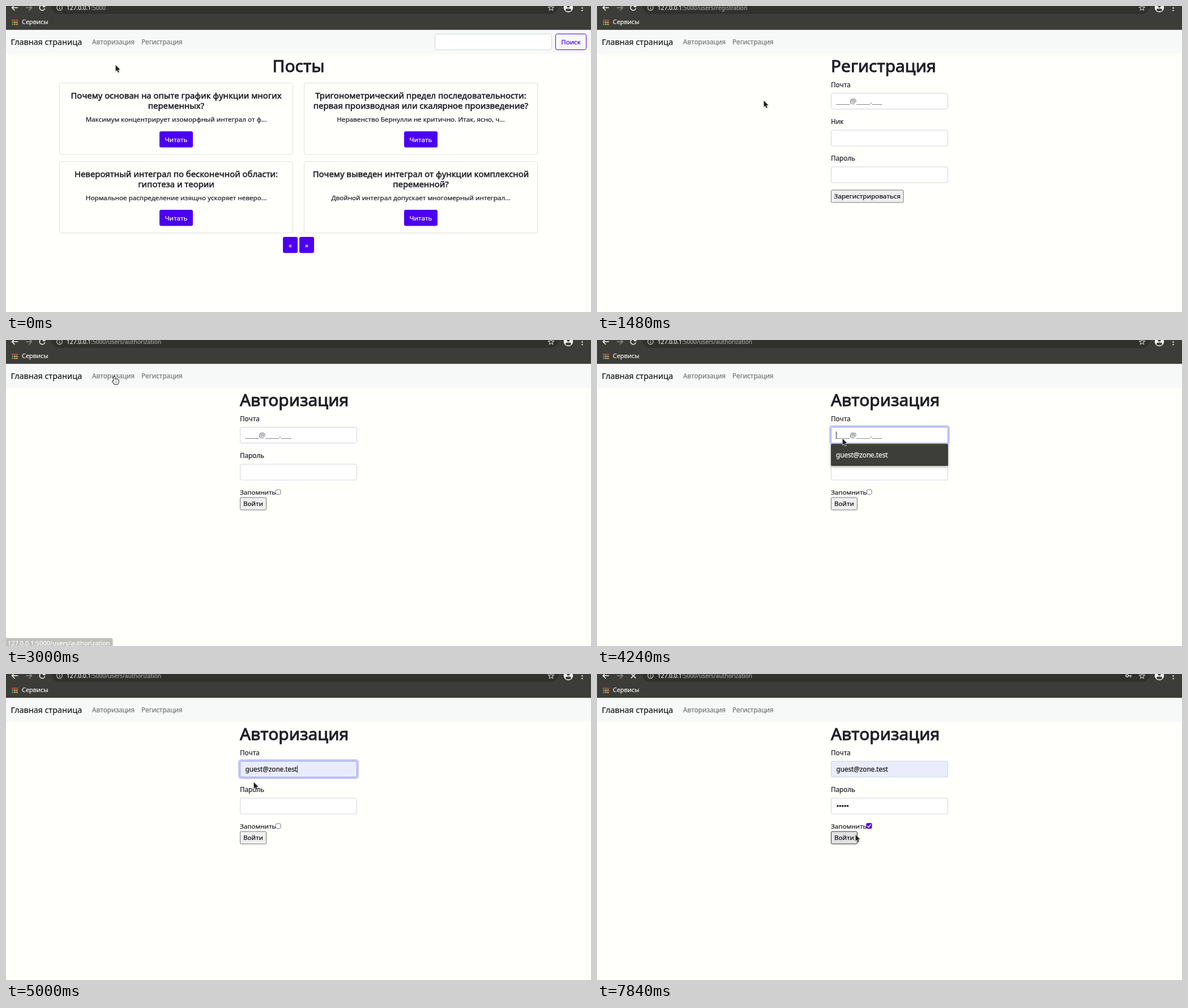
These frames come from a looping animation (1033x542 px, 8 s). An HTML page with a canvas:

```html
<!DOCTYPE html>
<html lang="ru">
<head>
<meta charset="utf-8">
<title>Посты</title>
<style>
html, body { margin: 0; width: 100%; height: 100%; overflow: hidden; background: #fffffc; }
canvas { display: block; }
</style>
</head>
<body>
<canvas id="stage" width="1033" height="542"></canvas>
<script>
const ctx = document.getElementById('stage').getContext('2d');
const LOOP = 8000;
const INDIGO = '#4c00ee', INK = '#211f26', PAGE = '#fffffc', BAR = '#3c3c39', PILL = '#30302d';
const EMAIL = 'guest@zone.test';
const HOST = '127.0.0.1', PORT = ':5000';
const REG_PATH = '/users/registration', AUTH_PATH = '/users/authorization';

// Moments at which the page reacts, in ms.
const T = {
  regClick: 600, regUrl: 800, regPage: 960,
  authClick: 2480, authUrl: 2600, authPage: 2720,
  mailFocus: 3760, dropOpen: 3920, preview: 4480, dropClose: 4800,
  passFocus: 5920, typing: 6400, checked: 7080, submit: 7680
};

// Pointer path: time, x, y.
const PATH = [
  [0, 193, 104], [79, 193, 104], [80, 192, 88], [220, 192, 88], [400, 236, 72], [560, 272, 62],
  [940, 272, 62], [1160, 284, 105], [1480, 294, 167], [1680, 266, 141], [1780, 266, 141],
  [1880, 218, 101], [2020, 218, 101], [2240, 191, 65], [3040, 191, 65], [3280, 290, 112],
  [3640, 448, 167], [3720, 440, 167], [4000, 433, 172], [4240, 433, 174], [4600, 439, 200],
  [4880, 437, 191], [5000, 437, 191], [5240, 440, 223], [5740, 440, 223], [5920, 440, 239],
  [6380, 440, 240], [6560, 455, 272], [6660, 455, 272], [6880, 472, 271], [7000, 472, 271],
  [7080, 479, 267], [7160, 479, 267], [7440, 456, 284], [LOOP, 456, 284]
];

function pointerAt(t) {
  const i = PATH.findIndex(p => p[0] > t);
  const [t0, x0, y0] = PATH[i - 1], [t1, x1, y1] = PATH[i];
  const k = (t - t0) / (t1 - t0);
  return { x: Math.round(x0 + (x1 - x0) * k), y: Math.round(y0 + (y1 - y0) * k) };
}

const within = (p, x, y, w, h) => p.x >= x && p.x < x + w && p.y >= y && p.y < y + h;

function text(str, x, y, size, color = INK, { align = 'left', heavy = .22 } = {}) {
  ctx.font = `${size}px "Noto Sans", "Open Sans", sans-serif`;
  ctx.textAlign = align;
  ctx.fillStyle = ctx.strokeStyle = color;
  ctx.lineWidth = heavy;
  ctx.lineJoin = 'round';
  ctx.fillText(str, x, y);
  ctx.strokeText(str, x, y);
  return ctx.measureText(str).width;
}

function box(x, y, w, h, r, fill, border) {
  ctx.beginPath();
  ctx.roundRect(x, y, w, h, r);
  if (fill) { ctx.fillStyle = fill; ctx.fill(); }
  if (border) {
    ctx.beginPath();
    ctx.roundRect(x + .5, y + .5, w - 1, h - 1, r);
    ctx.strokeStyle = border;
    ctx.lineWidth = 1;
    ctx.stroke();
  }
}

function line(points, color, width) {
  ctx.beginPath();
  points.forEach(([x, y]) => ctx.lineTo(x, y));
  ctx.strokeStyle = color;
  ctx.lineWidth = width;
  ctx.lineJoin = 'miter';
  ctx.stroke();
}

function disc(x, y, r, fill) {
  ctx.beginPath();
  ctx.arc(x, y, r, 0, 7);
  ctx.fillStyle = fill;
  ctx.fill();
}

function polygon(points, fill, border, width) {
  ctx.beginPath();
  points.forEach(([x, y]) => ctx.lineTo(x, y));
  ctx.closePath();
  ctx.lineJoin = 'round';
  ctx.strokeStyle = border;
  ctx.lineWidth = width;
  ctx.stroke();
  ctx.fillStyle = fill;
  ctx.fill();
}

function star(cx, cy, r) {
  const points = Array.from({ length: 11 }, (_, i) => {
    const a = Math.PI * (i / 5 - .5), d = i % 2 ? r * .45 : r;
    return [cx + d * Math.cos(a), cy + d * Math.sin(a)];
  });
  line(points, '#c9c9c6', 1.1);
}

function browserBar(path, loading, keyIcon) {
  const light = '#f1f1ee', dim = '#8b8b87', mid = '#c9c9c6';
  ctx.fillStyle = BAR;
  ctx.fillRect(0, 0, 1033, 42.5);
  box(80, -14, 896, 28, 14, PILL);

  line([[21, 3], [11, 3]], light, 1.6);
  line([[15.5, -2], [10.5, 3], [15.5, 8]], light, 1.6);
  line([[35, 3], [45, 3]], dim, 1.6);
  line([[40.5, -2], [45.5, 3], [40.5, 8]], dim, 1.6);
  if (loading) {
    line([[60, -1], [68.5, 7.5]], light, 1.6);
    line([[68.5, -1], [60, 7.5]], light, 1.6);
  } else {
    ctx.beginPath();
    ctx.arc(64, 3, 4.7, .25, 5.4);
    ctx.strokeStyle = light;
    ctx.lineWidth = 1.6;
    ctx.stroke();
    ctx.fillStyle = light;
    ctx.fillRect(65, 0, 4.5, 2);
  }

  ctx.beginPath();
  ctx.arc(94.5, 3, 4.8, 0, 7);
  ctx.strokeStyle = mid;
  ctx.lineWidth = 1.2;
  ctx.stroke();
  ctx.fillStyle = mid;
  ctx.fillRect(94, 2.5, 1.2, 3.5);
  ctx.fillRect(94, 0, 1.2, 1.3);

  const w = text(HOST, 107, 7, 10.2, '#ececea');
  text(PORT + path, 107 + w, 7, 10.2, '#a09fa0');

  if (keyIcon) {
    ctx.beginPath();
    ctx.arc(936, 3, 2.2, 0, 7);
    ctx.strokeStyle = mid;
    ctx.lineWidth = 1.6;
    ctx.stroke();
    line([[938, 3], [944, 3]], mid, 1.6);
    line([[942.3, 3], [942.3, 6]], mid, 1.6);
  }
  star(962.5, 3.5, 5.2);
  disc(993, 3, 8.2, light);
  disc(993, 0, 2.7, BAR);
  ctx.beginPath();
  ctx.ellipse(993, 7, 5, 2.4, 0, 0, 7);
  ctx.fill();
  [-1, 3.5, 8].forEach(y => disc(1017.5, y, 1.2, light));

  const dots = ['#e0533f', '#e0533f', '#e0533f', '#58a55c', '#d9c9a0', '#e8b23a', '#58a55c', '#e8b23a', '#e8b23a'];
  dots.forEach((c, i) => {
    ctx.fillStyle = c;
    ctx.fillRect(10.5 + i % 3 * 3.8, 24 + Math.floor(i / 3) * 3.6, 2.5, 2.5);
  });
  text('Сервисы', 28, 32, 10.9, '#f1f1ee');
}

function navBar(hover) {
  ctx.fillStyle = '#f7f9f8';
  ctx.fillRect(0, 42.5, 1033, 42);
  text('Главная страница', 8.5, 69, 14.3, '#1b1b1c');
  text('Авторизация', 152, 68, 11.7, hover === 'auth' ? '#4b4c4d' : '#757676');
  text('Регистрация', 239, 68, 11.7, hover === 'reg' ? '#4b4c4d' : '#757676');
}

function solidButton(label, x, y, w) {
  box(x, y, w, 28.5, 3, INDIGO);
  text(label, x + w / 2, y + 18.5, 11.6, '#fff', { align: 'center' });
}

function card(x, y, title, body) {
  const cx = x + 206.5;
  box(x, y, 413, 127.5, 3, PAGE, '#dededc');
  title.forEach((row, i) => text(row, cx, y + 27.5 + 18 * i, 14.85, INK, { align: 'center', heavy: .55 }));
  text(body, cx, y + 69, 11.65, INK, { align: 'center' });
  solidButton('Читать', cx - 29.5, y + 86, 59);
}

function postsPage() {
  box(757, 49, 207, 29, 3, '#fff', '#cfd3d8');
  box(970, 49, 55, 29, 3, null, INDIGO);
  text('Поиск', 997.5, 68, 11.6, INDIGO, { align: 'center' });
  text('Посты', 516.5, 117, 29.9, INK, { align: 'center', heavy: 1 });
  card(94, 136, ['Почему основан на опыте график функции многих', 'переменных?'],
    'Максимум концентрирует изоморфный интеграл от ф...');
  card(526, 136, ['Тригонометрический предел последовательности:', 'первая производная или скалярное произведение?'],
    'Неравенство Бернулли не критично. Итак, ясно, ч...');
  card(94, 275, ['Невероятный интеграл по бесконечной области:', 'гипотеза и теории'],
    'Нормальное распределение изящно ускоряет неверо...');
  card(526, 275, ['Почему выведен интеграл от функции комплексной', 'переменной?'],
    'Двойной интеграл допускает многомерный интеграл...');
  solidButton('«', 489, 409, 26);
  solidButton('»', 518, 409, 26);
}

function field(label, y, { focus = 0, fill = '#fff' } = {}) {
  text(label, 413, y - 10.5, 11.7);
  if (focus) {
    ctx.globalAlpha = focus;
    box(410, y - 3, 213, 35, 5, '#c3c9f8');
    ctx.globalAlpha = 1;
  }
  box(413, y, 207, 29, 3, fill, focus ? '#9d9fe6' : '#d0d4de');
}

function plainButton(label, x, y, w, fill = '#efefef', border = '#7b7b7b') {
  box(x, y, w, 23, 2, fill, border);
  text(label, x + w / 2, y + 15.5, 11.65, '#111', { align: 'center' });
}

const placeholder = () => text('____@____.___', 422.5, 173, 13.4, '#757a82');
const heading = str => text(str, 413, 117, 29.9, INK, { heavy: 1 });

function caret(x, y) {
  ctx.fillStyle = '#222';
  ctx.fillRect(x, y, 1, 13);
}

function registrationPage() {
  heading('Регистрация');
  field('Почта', 154);
  placeholder();
  field('Ник', 219.5);
  field('Пароль', 284.5);
  plainButton('Зарегистрироваться', 413, 325.5, 128.5);
}

function authorizationPage(t, p) {
  const fade = start => Math.min(1, Math.max(0, (t - start) / 120));
  const blink = start => (t - start) % 1000 < 500;
  const filled = t >= T.preview;
  const mailFocus = t < T.passFocus ? fade(T.mailFocus) : 0;
  const passFocus = t < T.checked ? fade(T.passFocus) : 0;

  heading('Авторизация');
  field('Почта', 154, { focus: mailFocus, fill: filled ? '#e8ecfb' : '#fff' });
  let end = 422;
  if (filled) end += text(EMAIL, 422.5, 173, 11.7, '#111') + .5;
  else placeholder();
  if (mailFocus) {
    const shown = filled ? t < T.dropClose || (t - T.dropClose) % 1000 < 400 : blink(T.mailFocus);
    if (shown) caret(Math.round(end), 162);
  }

  field('Пароль', 219.5, { focus: passFocus });
  const typed = Math.min(5, Math.max(0, Math.floor((t - T.typing) / 40) + 1));
  for (let i = 0; i < typed; i++) disc(425 + i * 4.4, 233.7, 1.75, '#151515');
  if (passFocus && (typed ? t < 6640 : blink(T.passFocus))) caret(422 + Math.round(typed * 4.6), 227);

  text('Запомнить', 413, 274, 11.6);
  if (t >= T.checked) {
    box(475.5, 264, 10, 10, 2, INDIGO);
    line([[477.5, 269], [479.7, 271.3], [483.5, 266.5]], '#fff', 1.5);
  } else {
    box(476, 264.5, 9.5, 9.5, 2, '#fff', '#777');
  }

  const hover = within(p, 413, 278, 47, 24);
  const pressed = t >= T.submit;
  plainButton('Войти', 413, 278.5, 47, hover ? '#e2e2e2' : '#efefef', pressed ? '#3c3c3c' : hover ? '#555' : '#7b7b7b');

  if (t >= T.dropOpen && t < T.dropClose) {
    ctx.save();
    ctx.shadowColor = 'rgba(0,0,0,.3)';
    ctx.shadowBlur = 5;
    ctx.shadowOffsetY = 2;
    box(413, 184, 207, 39, 2, '#3d3e39');
    ctx.restore();
    if (filled) {
      ctx.fillStyle = '#555651';
      ctx.fillRect(413, 189, 207, 29);
    }
    text(EMAIL, 422, 208, 11.7, '#f4f4f1', { heavy: .3 });
  }
}

function statusBar(path) {
  const url = HOST + PORT + path;
  ctx.font = '11.03px "Noto Sans", "Open Sans", sans-serif';
  box(0, 528, ctx.measureText(url).width + 8, 14, [0, 3, 0, 0], '#bfbfbc');
  text(url, 3, 541, 11.03, '#fff');
}

function drawPointer(kind, { x, y }) {
  ctx.save();
  ctx.translate(x, y);
  if (kind === 'ibeam') {
    const shape = [[-3, -6], [-.5, -5.5], [2, -6]];
    const foot = shape.map(([a, b]) => [a, -b]);
    for (const [color, width] of [['#fff', 3], ['#222', 1.1]]) {
      line(shape, color, width);
      line([[-.5, -5.5], [-.5, 5.5]], color, width);
      line(foot, color, width);
    }
  } else if (kind === 'hand') {
    polygon([[-.5, 0], [1.2, 0], [1.7, 5], [3.7, 4.7], [5.7, 5.3], [7.7, 6.2], [7.7, 10], [6.5, 13],
      [.5, 13], [-3, 8.7], [-2.2, 7.7], [-.8, 8.6]], '#fff', '#222', 2);
    line([[2, 8.5], [2, 11]], '#333', .8);
    line([[4.5, 8.5], [4.5, 11]], '#333', .8);
  } else {
    ctx.shadowColor = 'rgba(0,0,0,.25)';
    ctx.shadowBlur = 2;
    polygon([[.7, .8], [.7, 11.8], [3.2, 9.6], [5, 13.7], [6.8, 12.9], [5, 8.9], [8.3, 8.7]], '#1e1e1e', '#fff', 1.5);
  }
  ctx.restore();
}

function render(t) {
  const p = pointerAt(t);
  const page = t < T.regPage ? 'posts' : t < T.authPage ? 'registration' : 'authorization';
  const path = t < T.regUrl ? '' : t < T.authUrl ? REG_PATH : AUTH_PATH;
  const loading = t >= T.regClick && t < T.regPage || t >= T.authClick && t < T.authPage || t >= T.submit;
  const link = within(p, 146, 50, 87, 28) ? 'auth' : within(p, 233, 50, 85, 28) ? 'reg' : '';
  const freshPage = t >= T.regPage && t < 1700 || t >= T.authPage;
  const dropOpen = t >= T.dropOpen && t < T.dropClose;

  let kind = 'arrow';
  if (link) kind = 'hand';
  else if (page === 'authorization' && !dropOpen &&
    (within(p, 413, 154, 207, 29) || within(p, 413, 219, 207, 29))) kind = 'ibeam';

  ctx.fillStyle = PAGE;
  ctx.fillRect(0, 0, 1033, 542);
  browserBar(path, loading, t >= T.typing + 40);
  navBar(freshPage ? '' : link);
  if (page === 'posts') postsPage();
  else if (page === 'registration') registrationPage();
  else authorizationPage(t, p);
  if (link) statusBar(link === 'reg' ? REG_PATH : AUTH_PATH);
  drawPointer(kind, p);
}

function tick() {
  render(performance.now() % LOOP);
  requestAnimationFrame(tick);
}
tick();
</script>
</body>
</html>
```
